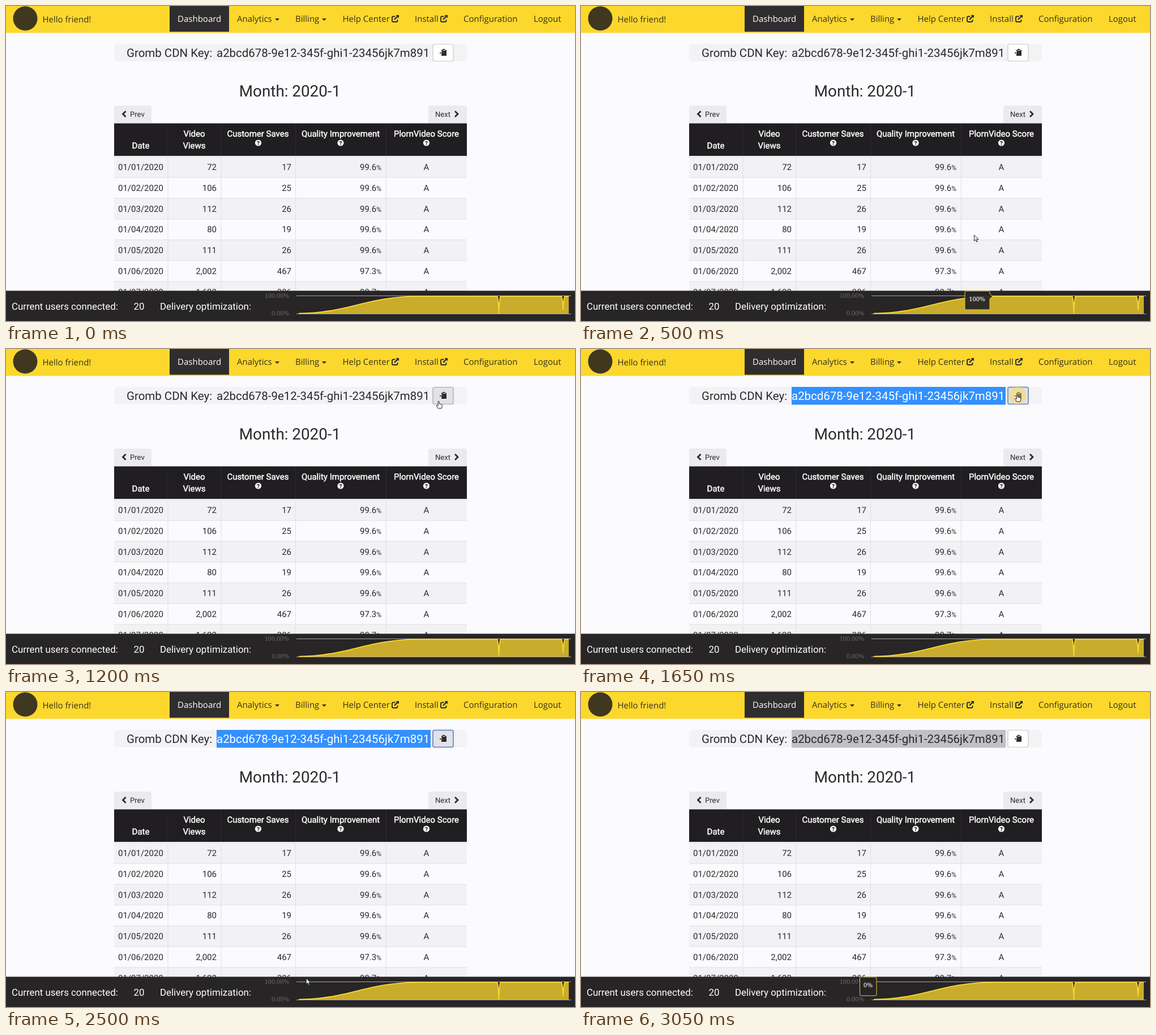
Animation, 1005 px wide and 557 px high, one loop 3.1 s. Source, as an HTML page:

```html
<!DOCTYPE html>
<html lang="en">
<head>
<meta charset="utf-8">
<title>Dashboard</title>
<style>
  html, body { margin: 0; width: 100%; height: 100%; overflow: hidden; background: #fbfafc; }
  svg { display: block; width: 1005px; height: 557px; font: 15px Roboto, sans-serif; fill: #2b292b; text-rendering: geometricPrecision; }
  .nav { font-family: "Open Sans", sans-serif; fill: #37301f; }
  .axis, .tip { font: 11px "Noto Serif", serif; }
  .axis { fill: #68655f; text-anchor: end; }
  .tip { fill: #fff; text-anchor: middle; }
  .head { fill: #fff; stroke: #fff; stroke-width: .45px; text-anchor: middle; }
  .foot { font-size: 16.87px; fill: #fff; }
  .key { font-size: 20.47px; }
  .line { fill: none; stroke: #2b292b; }
  .mid { text-anchor: middle; }
  .end { text-anchor: end; }
</style>
</head>
<body>
<svg viewBox="0 0 1005 557">
  <defs>
    <radialGradient id="glow">
      <stop offset="0" stop-color="#f7dc6a" stop-opacity=".35"/>
      <stop offset=".72" stop-color="#f5d95f" stop-opacity=".6"/>
      <stop offset="1" stop-color="#f5d95f" stop-opacity="0"/>
    </radialGradient>
    <g id="external" class="line" stroke-width="1.9">
      <path d="M6.5 2.5H3Q1 2.5 1 4.5V10Q1 12 3 12H8.5Q10.5 12 10.5 10V8"/>
      <path d="M5 8L11 2" stroke-width="2.3"/>
      <path d="M7.5 0H13V5.5Z" fill="#2b292b" stroke="none"/>
    </g>
    <path id="caret" d="M0 0H8L4 4Z"/>
  </defs>

  <rect width="1005" height="557" fill="#fbfafc"/>
  <rect width="1005" height="47.5" fill="#fcd82d"/>
  <circle cx="34" cy="22" r="21.5" fill="#40371f"/>
  <rect x="289" width="105" height="45.5" fill="#302d2f"/>
  <g class="nav" id="nav"></g>
  <use href="#caret" x="475" y="22"/>
  <use href="#caret" x="558" y="22"/>
  <use href="#external" x="681" y="16"/>
  <use href="#external" x="767" y="16"/>

  <rect x="191" y="67" width="623" height="31" rx="6" fill="#f3f2f4"/>
  <text class="key" x="213" y="90">Gromb CDN Key:</text>
  <rect id="selection" x="372" y="67" width="378" height="31.5"/>
  <text class="key" id="key" x="372" y="90">a2bcd678-9e12-345f-ghi1-23456jk7m891</text>
  <rect id="button" x="754" y="67.5" width="36" height="30" rx="3"/>
  <g id="clipboard">
    <path d="M769 78L771 77Q773 74 775 77L778 78V88H769V85L774 83L769 80Z"/>
    <path d="M766 83H771" class="line" stroke-width="1.6"/>
    <path d="M770 80L774 83L770 86Z"/>
    <path d="M771 78.5H776" stroke="#f5f5f5" stroke-width="1"/>
  </g>

  <text class="mid" x="501.5" y="160" font-size="27.8">Month: 2020-1</text>
  <path d="M191 207V180Q191 176 195 176H253Q257 176 257 180V207ZM746 207V180Q746 176 750 176H810Q814 176 814 180V207Z" fill="#ebeaec"/>
  <path class="line" d="M211.5 186L206.5 191L211.5 196M793 186L798 191L793 196" stroke-width="2.8"/>
  <g font-size="13.1"><text x="219" y="196">Prev</text><text x="758" y="196">Next</text></g>
  <g id="table"></g>

  <rect y="503.5" width="1005" height="54" fill="#272526"/>
  <g class="foot">
    <text x="10" y="537">Current users connected:</text>
    <text x="225.5" y="537">20</text>
    <text x="272" y="537">Delivery optimization:</text>
  </g>
  <g class="axis"><text x="500" y="516">100.00%</text><text x="500" y="546.5">0.00%</text></g>
  <path d="M513 512.5H998M513 544.5H998" stroke="#aaa8a6" stroke-width="1"/>
  <path id="area" fill="#c9ac2c"/>
  <path id="curve" fill="none" stroke="#f8d831" stroke-width="1.8" stroke-linejoin="round"/>

  <g id="fullTip">
    <path d="M680 504H720Q722 504 722 506V509L727 513.5L722 518V535Q722 537 720 537H680Q678 537 678 535V506Q678 504 680 504Z" fill="#272526" fill-opacity=".94" stroke="#e6c935"/>
    <text class="tip" x="699.5" y="522">100%</text>
  </g>
  <g id="zeroTip">
    <rect x="492.5" y="504" width="29.5" height="33" rx="2" fill="#272526" fill-opacity=".94" stroke="#e6c935"/>
    <text class="tip" x="507" y="522">0%</text>
  </g>

  <circle id="halo" fill="url(#glow)"/>
  <g id="cursor" fill="#fff" stroke="#222" stroke-width="1" stroke-linejoin="round">
    <path id="arrow" d="M.5 .5V11L3 8.8L4.7 12.7L6.4 12L4.8 8.2H8Z"/>
    <path id="hand" d="M-1 1Q0 -.8 1.2 1V5L5.4 6Q6.6 6.4 6.4 8L5.5 13H-1L-4 8.5Q-4 7 -2.6 7.4L-1 8.8Z"/>
  </g>
</svg>
<script>
const LOOP = 3100, SELECT = 1600, BLUR = 2950;
const $ = id => document.getElementById(id);
const text = (x, y, label, cls = '', extra = '') =>
  `<text x="${x}" y="${y}" class="${cls}" ${extra}>${label}</text>`;

const links = [[64.5, 'Hello friend!'], [303, 'Dashboard'], [408, 'Analytics'], [511, 'Billing'],
  [594.5, 'Help Center'], [722, 'Install'], [808, 'Configuration'], [932, 'Logout']];
$('nav').innerHTML = links.map(([x, label], i) =>
  text(x, i ? 28 : 29, label, '', i === 1 ? 'fill="#fff"' : '')).join('');

function buildTable() {
  const rows = [['72', 17, 99.6], ['106', 25, 99.6], ['112', 26, 99.6], ['80', 19, 99.6],
    ['111', 26, 99.6], ['2,002', 467, 97.3], ['1,622', 386, 98.7]];
  const edges = [286, 380, 511.5, 671.5];
  const top = 266.5, step = 36.75;
  let out = '';
  rows.forEach(([views, saves, quality], i) => {
    const y = top + step * i, base = y + 23.5;
    out += `<rect x="191" y="${y}" width="623" height="${step}" fill="${i % 2 ? '#fbfafc' : '#f2f1f3'}"/>`
      + `<path d="M191 ${y}H814" stroke="#e0dfe1"/>`
      + text(198, base, `01/0${i + 1}/2020`) + text(372, base, views, 'end')
      + text(504, base, saves, 'end')
      + text(663, base, `${quality}<tspan font-size="12">%</tspan>`, 'end')
      + text(742.5, base, 'A', 'mid');
  });
  out += edges.map(x => `<path d="M${x} 266V504" stroke="#e0dfe1"/>`).join('');
  out += '<rect x="191" y="207.5" width="623" height="57.5" fill="#201e20"/>';
  out += edges.map(x => `<path d="M${x} 208V265" stroke="#2d2b2d"/>`).join('');
  const heads = [[238, 252, 'Date'], [332.5, 231, 'Video'], [332.5, 252, 'Views'],
    [445, 231, 'Customer Saves'], [591, 231, 'Quality Improvement'], [742.5, 231, 'PlornVideo Score']];
  out += heads.map(([x, y, label]) => text(x, y, label, 'head')).join('');
  out += [445.5, 591, 742.5].map(x => `<circle cx="${x}" cy="242" r="5.6" fill="#fff"/>`
    + text(x, 245.5, '?', 'mid', 'font-size="10" font-weight="900"')).join('');
  $('table').innerHTML = out;
}
buildTable();

const dip = (x, y) => `H${x - 2.8}Q${x - .6} 520 ${x} ${y}Q${x + .6} 520 ${x + 2.8} 513.3`;
const curve = `M517 543.6C600 543.6 640 513.3 728 513.3${dip(870.5, 543)}${dip(984, 537)}H994`;
$('curve').setAttribute('d', curve);
$('area').setAttribute('d', curve + 'V544H517Z');

// Pointer track: time, x, y
const track = [[300, 712, 570], [400, 703, 490], [500, 694, 405], [700, 705, 280], [900, 738, 165],
  [1050, 758, 110], [1200, 764, 92], [1450, 770, 81], [1650, 770.5, 80], [1800, 770.5, 80],
  [1950, 750, 125], [2100, 709, 209], [2300, 622, 365], [2500, 530, 505], [2600, 508, 575]];

function pointerAt(t) {
  const i = track.findIndex(p => p[0] > t);
  if (i < 1) return null;
  const [a, b] = [track[i - 1], track[i]];
  const k = (t - a[0]) / (b[0] - a[0]);
  return [a[1] + (b[1] - a[1]) * k, a[2] + (b[2] - a[2]) * k];
}

const set = (id, attrs) => Object.entries(attrs).forEach(([k, v]) => $(id).setAttribute(k, v));
const show = (id, on) => set(id, { visibility: on ? 'visible' : 'hidden' });
const ramp = (t, a, b) => Math.min(1, Math.max(0, (t - a) / (b - a)));

function draw(t) {
  const p = pointerAt(t);
  const hover = !!p && p[0] > 754 && p[0] < 790 && p[1] > 67 && p[1] < 98;
  show('arrow', p && !hover);
  show('hand', hover);
  if (p) set('cursor', { transform: `translate(${p[0]} ${p[1]})` });

  const selected = t >= SELECT, focused = selected && t < BLUR;
  show('selection', selected);
  set('selection', { fill: focused ? '#3390ff' : '#c1c0c2' });
  set('key', { fill: focused ? '#fff' : '#2b292b' });
  set('button', {
    fill: hover || focused ? '#e3e2e5' : '#fff',
    stroke: focused ? '#7796c8' : hover ? '#a5a4a8' : '#c9c8cb',
    'stroke-width': focused ? 2 : 1.2
  });

  const press = ramp(t, 1500, 1650), fade = ramp(t, 1650, 1800);
  set('halo', { cx: 771, cy: 82, r: 6 + 12 * press + 4 * fade, opacity: press * (1 - fade) });
  set('fullTip', { opacity: ramp(t, 380, 430) * (1 - ramp(t, 700, 850)) });
  set('zeroTip', { opacity: ramp(t, 2500, 2600) });
}

function frame(now) {
  draw(now % LOOP);
  requestAnimationFrame(frame);
}
draw(0);
requestAnimationFrame(frame);
</script>
</body>
</html>
```
